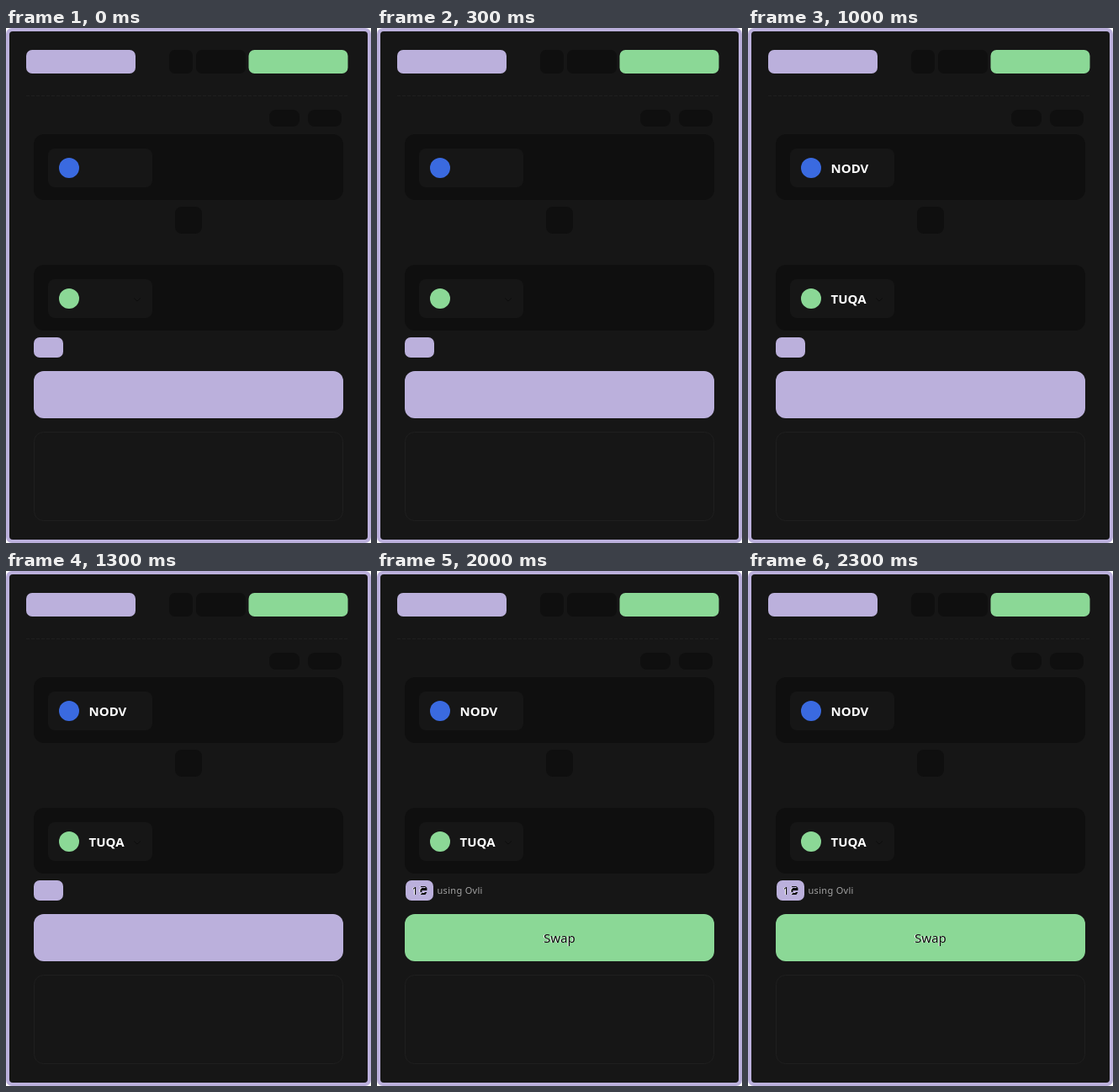
Animation of 434x611 px, one loop 2500 ms. Source, as an HTML page:

```html
<!DOCTYPE html>
<html lang="en">
<head>
<meta charset="utf-8">
<title>Swap form</title>
<style>
  html, body { margin: 0; width: 100%; height: 100%; overflow: hidden; background: #fff; }
  svg { display: block; width: 434px; height: 611px; }
  text { font-family: "Noto Sans", "Open Sans", sans-serif; }
  .lilac { fill: #bbb0dc; }
  .green { fill: #8bd896; }
  .panel { fill: #161616; }
  .dark { fill: #0f0f0f; }
  .token { fill: #fff; font-size: 15px; font-weight: 600; }
  .note { fill: #a3a3a3; font-size: 11px; letter-spacing: .3px; }
  .edge { fill: #fff; }
  .ink { fill: #0c0c0c; }
  .line { fill: none; stroke: #1f1f1f; }
</style>
</head>
<body>
<svg viewBox="0 0 434 611">
  <defs>
    <g id="count">
      <text x="41" y="383.5" font-size="13" font-weight="500">1</text>
      <path d="M51 374h6l2 2v3h-6v2h6l-2 3h-6l2-2h3v-1h-5v-3l2-2h4v-1h-5z"/>
    </g>
    <text id="swap" x="216.5" y="440.5" font-size="15" font-weight="500" text-anchor="middle">Swap</text>
  </defs>

  <rect class="lilac" width="434" height="611" rx="7"/>
  <rect class="panel" x="4" y="4" width="426" height="603" rx="4"/>

  <rect class="lilac" x="24" y="26" width="130" height="28" rx="7"/>
  <rect class="dark" x="194" y="26" width="28" height="28" rx="7"/>
  <rect class="dark" x="226" y="26" width="59" height="28" rx="7"/>
  <rect class="green" x="288.5" y="26" width="118" height="28" rx="7"/>
  <path class="line" d="M24 80.5H408" stroke-dasharray="4 2"/>

  <rect class="dark" x="313" y="97" width="36" height="20" rx="8"/>
  <rect class="dark" x="359" y="97" width="40" height="20" rx="8"/>

  <rect class="dark" x="33" y="126" width="368" height="78" rx="12"/>
  <rect class="panel" x="50" y="143" width="124" height="46" rx="8"/>
  <circle cx="75" cy="166" r="12" fill="#3a6ae0"/>

  <rect class="dark" x="201" y="212" width="32" height="32" rx="8"/>

  <rect class="dark" x="33" y="281" width="368" height="78" rx="12"/>
  <rect class="panel" x="50" y="298" width="124" height="46" rx="8"/>
  <circle class="green" cx="75" cy="321" r="12"/>
  <path d="M152 320.5l4 3.5l4-3.5" fill="none" stroke="#0d0d0d"/>

  <rect class="line" x="33.5" y="479.5" width="367" height="105" rx="11"/>

  <text class="token" x="98.5" y="172.3" data-from="500">NODV</text>
  <text class="token" x="98.5" y="327.3" data-from="1000">TUQA</text>

  <rect class="lilac" x="33" y="367" width="35" height="24" rx="7" data-to="1500"/>
  <g data-from="1500">
    <rect class="lilac" x="34" y="367" width="33" height="24" rx="7"/>
    <use href="#count" class="edge" x="-.6"/>
    <use href="#count" class="ink" x=".4"/>
    <text class="note" x="71.5" y="383">using Ovli</text>
  </g>

  <rect class="lilac" x="33" y="407" width="368" height="56" rx="12" data-to="2000"/>
  <g data-from="2000">
    <rect class="green" x="33" y="407" width="368" height="56" rx="12"/>
    <use href="#swap" class="edge" x="-.6"/>
    <use href="#swap" class="ink" x=".4"/>
  </g>
</svg>
<script>
  const LOOP = 2500;

  // Hard switch of visibility once per loop.
  function toggle(el, at, before, after) {
    el.animate([
      { opacity: before, offset: 0, easing: 'step-end' },
      { opacity: after, offset: at / LOOP },
      { opacity: after, offset: 1 }
    ], { duration: LOOP, iterations: Infinity }).startTime = 0;
  }

  for (const el of document.querySelectorAll('[data-from]')) toggle(el, +el.dataset.from, 0, 1);
  for (const el of document.querySelectorAll('[data-to]')) toggle(el, +el.dataset.to, 1, 0);
</script>
</body>
</html>
```
